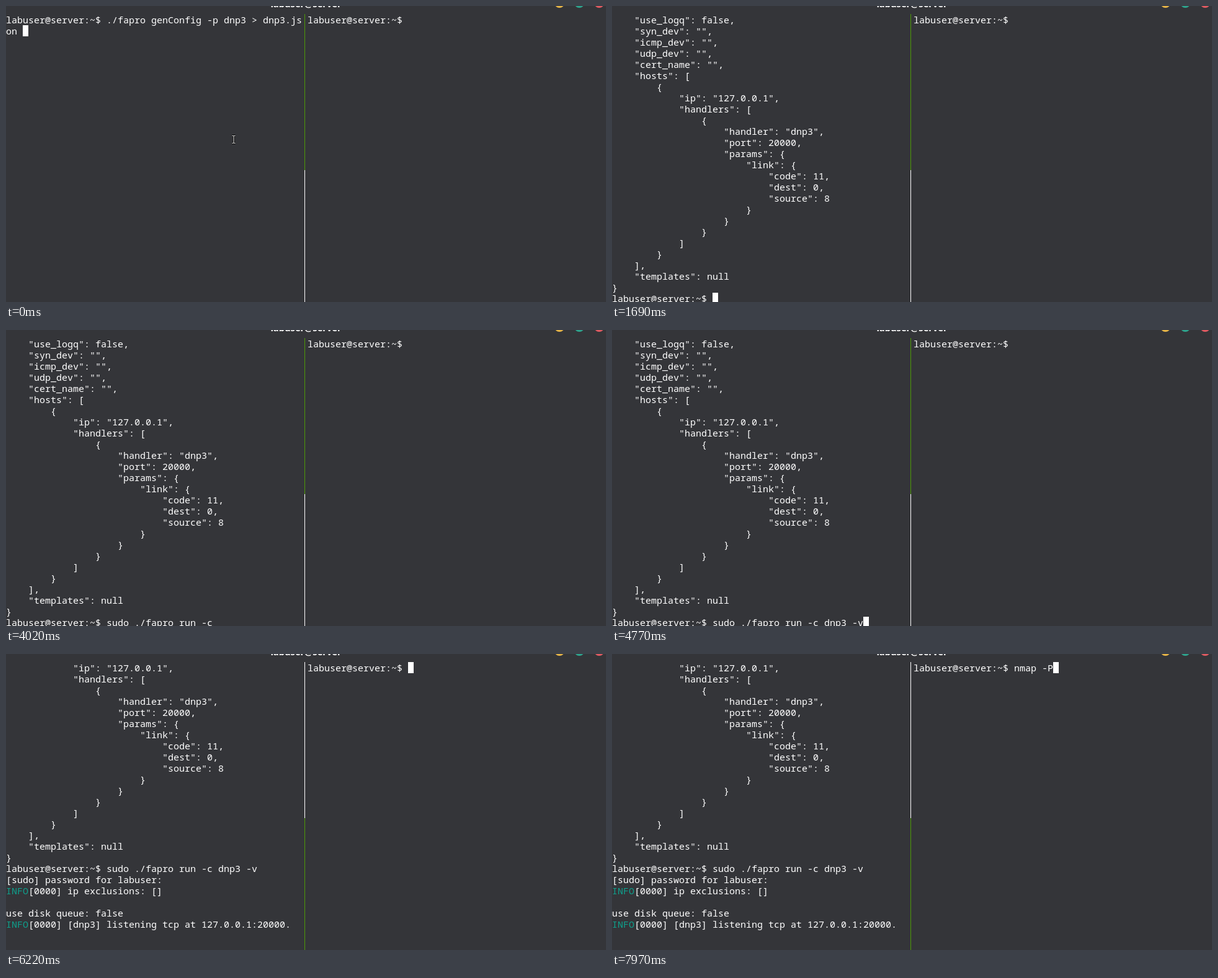
An HTML page for the animation above (8 s loop, 967 px wide and 478 px high).

```html
<!DOCTYPE html>
<html lang="en">
<head>
<meta charset="utf-8">
<title>Terminal</title>
<style>
html, body { margin: 0; width: 100%; height: 100%; overflow: hidden; background: #343539; color: #fff; }
body { position: relative; }
pre, .cursor, .rule, .dot, #title, #mouse { position: absolute; margin: 0; }
pre { top: 13px; font: 15px/18px "Noto Sans Mono", monospace; }
b { font-weight: normal; color: #0f9f8c; }
.cursor { width: 9px; height: 18px; background: #fff; }
.rule { left: 481px; width: 1px; background: #fff; }
.rule.on { background: #4e9a06; }
.dot { top: -13px; width: 16px; height: 16px; border-radius: 50%; }
#title { left: 0; width: 967px; top: -14px; text-align: center; font: bold 14.67px/20px "Noto Sans", sans-serif; }
#mouse { left: 361.5px; top: 207px; fill: none; }
</style>
</head>
<body>
<div id="title">labuser@server</div>
<div class="dot" style="left:884px;background:#e8b647"></div>
<div class="dot" style="left:916px;background:#2ea58e"></div>
<div class="dot" style="left:948px;background:#e25b62"></div>
<pre id="left" style="left:0"></pre>
<pre id="right" style="left:486px"></pre>
<div class="rule" id="upper" style="top:13px;height:252px"></div>
<div class="rule" id="lower" style="top:265px;height:213px"></div>
<div class="cursor" id="cursor"></div>
<svg id="mouse" width="10" height="17">
  <defs><path id="beam" d="M2.5 2.5h2l.5.5.5-.5h2M5 3v11M2.5 14.5h2l.5-.5.5.5h2"/></defs>
  <use href="#beam" stroke="#000" stroke-width="3"/>
  <use href="#beam" stroke="#fff"/>
</svg>
<script>
const LOOP = 8000, ROWS = 26, CELL = 9, LINE = 18, TOP = 13, FOCUS = 6220;
const $ = id => document.getElementById(id);
const prompt = 'labuser@server:~$ ';

const config = {
  use_logq: false, syn_dev: '', icmp_dev: '', udp_dev: '', cert_name: '',
  hosts: [{
    ip: '127.0.0.1',
    handlers: [{
      handler: 'dnp3', port: 20000,
      params: { link: { code: 11, dest: 0, source: 8 } }
    }]
  }],
  templates: null
};

// Keys typed evenly, the first at `from` and the last at `to`
const type = (from, to, keys) => [...keys].map((key, i) =>
  [from + (to - from) * i / Math.max(1, keys.length - 1), key]);

const leftLog = [
  [0, prompt + './fapro genConfig -p dnp3 > dnp3.js\non '],
  [40, '\n'],
  [110, prompt],
  ...type(440, 660, 'cat '),
  ...type(870, 1050, 'dnp'),
  ...type(1190, 1300, '3.'),
  [1440, 'json '],
  [1530, '\n'],
  [1610, JSON.stringify(config, null, 4) + '\n'],
  [1690, prompt],
  ...type(2190, 2620, 'sudo ./'),
  ...type(2690, 2950, 'fapro'),
  ...type(3020, 3560, ' run -c'),
  [3700, ' '],
  ...type(4090, 4490, 'dnp3 -'),
  [4770, 'v'],
  [4950, ' '],
  [5060, '\n[sudo] password for labuser: '],
  [5450, '\nINFO[0000] ip exclusions: []\n\nuse disk queue: false\n' +
    'INFO[0000] [dnp3] listening tcp at 127.0.0.1:20000.\n\n']
];
const rightLog = [
  [0, prompt],
  ...type(7250, 7560, 'nmap '),
  [7830, '-'],
  [7970, 'P']
];

// Spans in which the blinking cursor is dark
const dark = [[370, 440], [2010, 2190], [4020, 4090], [5340, 5410],
  [5730, 5940], [6540, 6860], [7180, 7250]];

const linesAt = (log, t) => log.filter(([at]) => at <= t)
  .map(([, text]) => text).join('').split('\n').slice(-ROWS);

function show(id, lines) {
  const html = lines.join('\n').replace(/INFO/g, '<b>INFO</b>');
  const pane = $(id);
  if (pane.shown !== html) pane.innerHTML = pane.shown = html;
}

function draw(now) {
  const t = now % LOOP, inRight = t >= FOCUS;
  const left = linesAt(leftLog, t), right = linesAt(rightLog, t);
  show('left', left);
  show('right', right);
  $('upper').classList.toggle('on', !inRight);
  $('lower').classList.toggle('on', inRight);

  const lines = inRight ? right : left, cursor = $('cursor').style;
  cursor.left = (inRight ? 486 : 0) + lines[lines.length - 1].length * CELL + 'px';
  cursor.top = TOP + (lines.length - 1) * LINE + 'px';
  cursor.opacity = dark.some(([from, to]) => t >= from && t < to) ? 0 : 1;
  $('mouse').style.opacity = t < 40 ? 1 : 0;
}

const start = performance.now();
function tick() {
  draw(performance.now() - start);
  requestAnimationFrame(tick);
}
draw(0);
requestAnimationFrame(tick);
</script>
</body>
</html>
```
